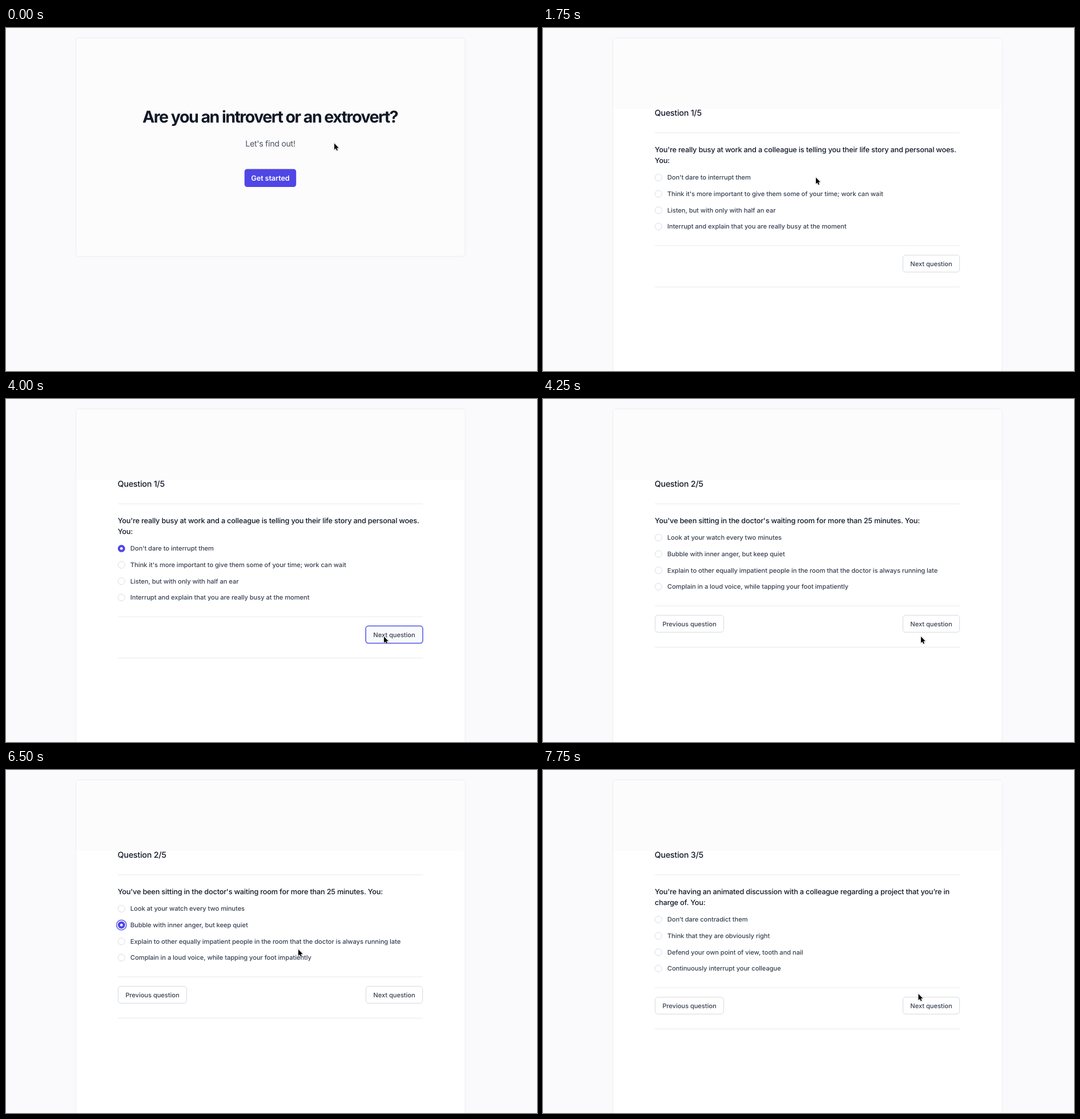
Animation, 930 px wide and 602 px high, one loop 8 s. Source, as an HTML page:

```html
<!DOCTYPE html>
<html lang="en">
<head>
<meta charset="utf-8">
<title>Quiz</title>
<style>
  html, body { margin: 0; width: 100%; height: 100%; overflow: hidden; background: #fafafc; }
  svg { display: block; }
  text {
    font-family: Inter, "Liberation Sans", sans-serif;
    font-optical-sizing: none;
    text-rendering: geometricPrecision;
  }
  .title { font-size: 28.6px; font-weight: 700; letter-spacing: -0.0542em; fill: #111827; }
  .lead { font-size: 14.3px; letter-spacing: -0.0255em; fill: #4b5563; }
  .cta { font-size: 12.7px; font-weight: 600; letter-spacing: -0.009em; fill: #fff; }
  .count { font-size: 14.3px; font-weight: 500; letter-spacing: -0.0165em; fill: #111827; }
  .question { font-size: 12.7px; font-weight: 500; letter-spacing: -0.014em; fill: #111827; }
  .label { font-size: 11.12px; font-weight: 500; letter-spacing: -0.0036em; fill: #374151; }
  .mid { text-anchor: middle; }
  .card { filter: drop-shadow(0 .8px 1.2px rgba(0, 0, 0, .13)); }
  .cursor { filter: drop-shadow(0 .8px .8px rgba(0, 0, 0, .3)); }
</style>
</head>
<body>
<svg id="stage" width="930" height="602" viewBox="0 0 930 602"></svg>
<script>
const LOOP = 8000, STEP = 250, LINE = 19.07;
const INDIGO = '#4f46e5', INDIGO_LIGHT = '#6366f1';
const stage = document.getElementById('stage');

const pages = [
  {
    lines: ["You're really busy at work and a colleague is telling you their life story and personal woes.", 'You:'],
    options: [
      "Don't dare to interrupt them",
      "Think it's more important to give them some of your time; work can wait",
      'Listen, but with only with half an ear',
      'Interrupt and explain that you are really busy at the moment'
    ]
  },
  {
    lines: ["You've been sitting in the doctor's waiting room for more than 25 minutes. You:"],
    options: [
      'Look at your watch every two minutes',
      'Bubble with inner anger, but keep quiet',
      'Explain to other equally impatient people in the room that the doctor is always running late',
      'Complain in a loud voice, while tapping your foot impatiently'
    ]
  },
  {
    lines: ["You're having an animated discussion with a colleague regarding a project that you’re in", 'charge of. You:'],
    options: [
      'Don’t dare contradict them',
      'Think that they are obviously right',
      'Defend your own point of view, tooth and nail',
      'Continuously interrupt your colleague'
    ]
  }
];

// Pointer waypoints: time, x, y
const path = [
  [0, 575, 202.5], [500, 580, 238], [750, 571, 257], [1000, 525, 261], [1250, 478, 262.5],
  [2000, 478, 262.5], [2250, 452, 347], [2500, 350, 300], [2750, 296, 264], [3000, 293, 261],
  [3250, 293, 261], [3500, 440, 330], [3750, 640, 408], [4000, 662, 417], [4500, 662, 417],
  [4750, 610, 396], [5000, 480, 345], [5250, 393, 303.5], [5500, 363, 276], [5750, 358, 269],
  [6250, 358, 269], [6500, 512, 315], [6750, 606, 352], [7000, 648, 384], [7250, 657.5, 393],
  [8000, 657.5, 393]
];

function pointerAt(t) {
  const i = path.findIndex(p => p[0] > t);
  const [t0, x0, y0] = path[i - 1], [t1, x1, y1] = path[i];
  const k = (t - t0) / (t1 - t0);
  return [x0 + (x1 - x0) * k, y0 + (y1 - y0) * k];
}

const text = (cls, x, y, str) => `<text class="${cls}" x="${x}" y="${y}">${str}</text>`;
const rect = (x, y, w, h, fill, extra = '') =>
  `<rect x="${x}" y="${y}" width="${w}" height="${h}" fill="${fill}" ${extra}/>`;
const circle = (x, y, r, fill, extra = '') =>
  `<circle cx="${x}" cy="${y}" r="${r}" fill="${fill}" ${extra}/>`;
const divider = y => rect(196, y, 534, 0.9, '#e5e7eb');

function button(x, y, w, label, { hover, focus } = {}) {
  const grow = focus ? 0.3 : 0;
  const stroke = focus ? `stroke="${INDIGO_LIGHT}" stroke-width="1.7"` : 'stroke="#d1d5db" stroke-width=".9"';
  return rect(x - grow, y - grow, w + 2 * grow, 29.6 + 2 * grow, hover ? '#f9fafb' : '#fff', `rx="4.6" ${stroke}`)
    + text('label mid', x + w / 2, y + 18.8, label);
}

function radio(y, checked, focus) {
  if (!checked) return circle(202.2, y, 6, '#fff', 'stroke="#d1d5db" stroke-width=".85"');
  return (focus ? circle(202.2, y, 8.7, '#fff', `stroke="${INDIGO_LIGHT}" stroke-width="1.6"`) : '')
    + circle(202.2, y, 6.4, INDIGO) + circle(202.2, y, 2.4, '#fff');
}

function intro(hover) {
  return rect(123, 18, 680.6, 382.5, '#fcfcfc', 'rx="4.8" class="card"')
    + text('title mid', 462.5, 166, 'Are you an introvert or an extrovert?')
    + text('lead mid', 463, 208, "Let's find out!")
    + rect(417.7, 247.4, 90.5, 31.7, hover ? INDIGO_LIGHT : INDIGO, 'rx="4.8"')
    + text('cta mid', 463, 268, 'Get started');
}

function quiz(index, { picked = -1, radioFocus, hover, focus } = {}) {
  const { lines, options } = pages[index];
  const dy = (lines.length - 1) * LINE;
  let out = rect(123, 18, 680.6, 640, '#fff', 'rx="4.8" class="card"')
    + rect(123, 18, 680.6, 124, '#fcfcfc', 'rx="4.8"')
    + text('count', 195.6, 154, `Question ${index + 1}/5`)
    + divider(183.6);
  lines.forEach((line, i) => out += text('question', 195.8, 218 + i * LINE, line));
  options.forEach((option, i) => {
    const y = 243.4 + dy + i * 28.65;
    out += radio(y, i === picked, radioFocus) + text('label', 217.8, y + 4, option);
  });
  out += divider(362.5 + dy) + divider(435 + dy);
  if (index) out += button(196.4, 379.7 + dy, 120, 'Previous question');
  return out + button(630.4, 379.7 + dy, 99.2, 'Next question', { hover, focus });
}

function scene(t) {
  if (t < 1750) return intro(t >= 1250);
  if (t < 4250) {
    return quiz(0, {
      picked: t >= 3250 ? 0 : -1,
      radioFocus: t < 4000,
      hover: t >= 3750,
      focus: t >= 4000
    });
  }
  if (t < 7750) {
    return quiz(1, {
      picked: t >= 6000 ? 1 : -1,
      radioFocus: t < 7500,
      hover: t >= 7000,
      focus: t >= 7500
    });
  }
  return quiz(2);
}

function cursor([x, y]) {
  return `<path class="cursor" transform="translate(${x} ${y})" fill="#000" stroke="#fff" stroke-width="1.5"
    stroke-linejoin="round" paint-order="stroke"
    d="M0 0V11L2.5 8.7L4.2 12.6L6 11.9L4.3 8.1H7.7Z"/>`;
}

let shown = -1;
function tick() {
  const t = Math.floor(performance.now() % LOOP / STEP) * STEP;
  if (t !== shown) {
    stage.innerHTML = scene(t) + cursor(pointerAt(t));
    shown = t;
  }
  requestAnimationFrame(tick);
}
tick();
</script>
</body>
</html>
```
